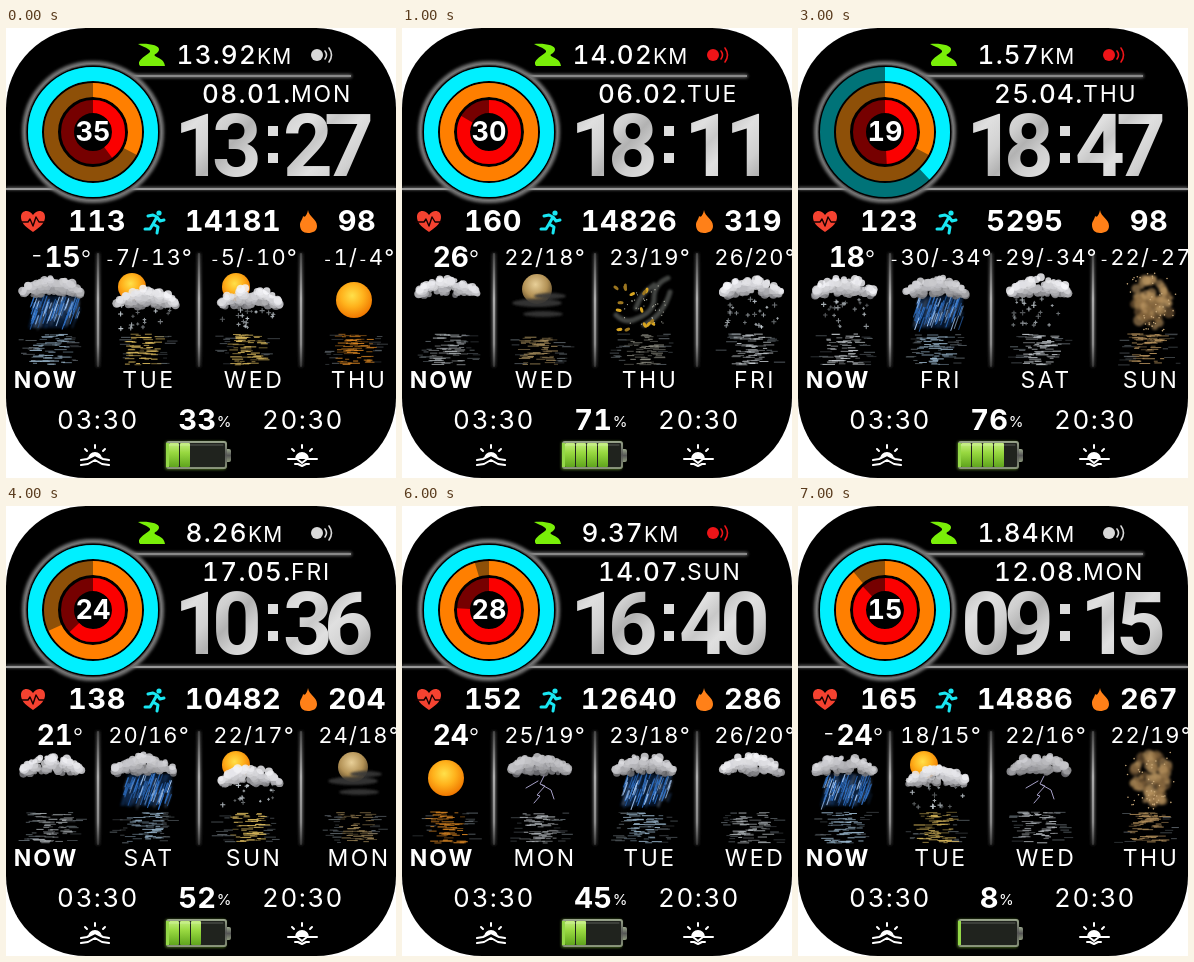
These frames come from a looping animation (390x450 px, 8 s). An HTML page:

```html
<!DOCTYPE html>
<html lang="en">
<head>
<meta charset="utf-8">
<title>Watch face</title>
<style>
html, body { margin: 0; width: 100%; height: 100%; overflow: hidden; background: #fff; }
svg { display: block; width: 390px; height: 450px; }
text { font-family: Inter, sans-serif; font-variant-numeric: tabular-nums; fill: #fff; white-space: pre; }
.clock { font-family: Roboto, sans-serif; font-weight: 700; font-size: 87px; fill: url(#metal); }
.line { fill: none; stroke-linecap: round; stroke-linejoin: round; }
</style>
</head>
<body>
<svg id="face" viewBox="0 0 390 450" xmlns="http://www.w3.org/2000/svg">
<defs>
  <clipPath id="body"><rect width="390" height="450" rx="80"/></clipPath>
  <filter id="glow" x="-30" y="-30" width="450" height="510" filterUnits="userSpaceOnUse"><feGaussianBlur stdDeviation="1.6"/></filter>
  <filter id="soft" x="-30%" y="-30%" width="160%" height="160%"><feGaussianBlur stdDeviation="1"/></filter>
  <linearGradient id="metal" gradientUnits="userSpaceOnUse" x1="170" y1="90" x2="212" y2="130" spreadMethod="reflect">
    <stop offset="0" stop-color="#c8c8c8"/><stop offset=".3" stop-color="#e0e0e0"/>
    <stop offset=".7" stop-color="#d0d0d0"/><stop offset="1" stop-color="#b2b2b2"/>
  </linearGradient>
  <linearGradient id="post" x1="0" y1="0" x2="0" y2="1">
    <stop offset="0" stop-color="#444"/><stop offset=".4" stop-color="#aaa"/>
    <stop offset=".8" stop-color="#888"/><stop offset="1" stop-color="#333"/>
  </linearGradient>
  <radialGradient id="sun" cx=".45" cy=".38" r=".62">
    <stop offset="0" stop-color="#ffe04a"/><stop offset=".5" stop-color="#ffb21c"/><stop offset="1" stop-color="#f07800"/>
  </radialGradient>
  <radialGradient id="moon" cx=".45" cy=".35" r=".65">
    <stop offset="0" stop-color="#e8cf98"/><stop offset=".6" stop-color="#b39256"/><stop offset="1" stop-color="#5e4a2a"/>
  </radialGradient>
  <linearGradient id="cell" x1="0" y1="0" x2="0" y2="1">
    <stop offset="0" stop-color="#c4ee80"/><stop offset=".4" stop-color="#98d840"/><stop offset="1" stop-color="#5fa51c"/>
  </linearGradient>
  <linearGradient id="shell" x1="0" y1="0" x2="0" y2="1">
    <stop offset="0" stop-color="#9aa68c"/><stop offset=".5" stop-color="#555"/><stop offset="1" stop-color="#8c987c"/>
  </linearGradient>
</defs>
</svg>
<script>
const STEP = 1000;
const DAYS = ['SUN', 'MON', 'TUE', 'WED', 'THU', 'FRI', 'SAT'];

// weekday, date, time, km, linked, dial, steps share, pulse, steps, kcal, battery, now, forecast, sky
const STATES = [
  [1, '08.01.', '13:27', '13.92', 1, '35', 1, 113, 14181, 98, 33, -15, ['-7/-13°', '-5/-10°', '-1/-4°'], 'rain sunsnow sunsnow sun'],
  [2, '06.02.', '18:11', '14.02', 0, '30', 1, 160, 14826, 319, 71, 26, ['22/18°', '23/19°', '26/20°'], 'cloud moon leaves snow'],
  [3, '13.03.', '00:09', '8.53', 1, '26', .42, 146, 5328, 188, 4, null, null, 'leaves snow rain rain'],
  [4, '25.04.', '18:47', '1.57', 0, '19', .38, 123, 5295, 98, 76, 18, ['-30/-34°', '-29/-34°', '-22/-27°'], 'snow rain snow dust'],
  [5, '17.05.', '10:36', '8.26', 1, '24', 1, 138, 10482, 204, 52, 21, ['20/16°', '22/17°', '24/18°'], 'cloud rain sunsnow moon'],
  [6, '08.06.', '19:02', '14.05', 0, '06', 1, 131, 5506, 251, 71, null, null, 'rain moon sunsnow rain'],
  [0, '14.07.', '16:40', '9.37', 0, '28', 1, 152, 12640, 286, 45, 24, ['25/19°', '23/18°', '26/20°'], 'sun storm rain cloud'],
  [1, '12.08.', '09:15', '1.84', 1, '15', 1, 165, 14886, 267, 8, -24, ['18/15°', '22/16°', '22/19°'], 'rain sunsnow storm dust'],
];

const text = (x, y, s, size, weight, gap = 0, anchor = 'middle') =>
  `<text x="${x}" y="${y}" font-size="${size}" font-weight="${weight}" letter-spacing="${gap}" text-anchor="${anchor}">${s}</text>`;
const span = (s, size, weight, extra = '') =>
  `<tspan font-size="${size}" font-weight="${weight}" ${extra}>${s}</tspan>`;
const line = (d, color, width = 1, extra = '') =>
  `<path class="line" d="${d}" stroke="${color}" stroke-width="${width}" ${extra}/>`;
const shape = (d, fill) => `<path d="${d}" fill="${fill}"/>`;
const dot = (x, y, r, fill, extra = '') =>
  `<circle cx="${x}" cy="${y}" r="${r}" fill="${fill}" ${extra}/>`;
const repeat = (n, fn) => Array.from({ length: n }, (_, i) => fn(i)).join('');

function random(seed) {
  return () => {
    seed = (seed * 1664525 + 1013904223) >>> 0;
    return seed / 4294967296;
  };
}

function ring(r, width, color, track, share) {
  const base = `cx="87" cy="104" r="${r}" fill="none" stroke-width="${width}"`;
  return `<circle ${base} stroke="${track}"/>` + (share >= 1
    ? `<circle ${base} stroke="${color}"/>`
    : `<circle ${base} stroke="${color}" pathLength="1" stroke-dasharray="${share} 2" transform="rotate(-90 87 104)"/>`);
}

// Weather pictures are drawn around x = 0.
function water(rnd, color) {
  return repeat(75, () => {
    const v = rnd(), y = 306 + v * 31;
    const x = (rnd() + rnd() - 1) * 32, w = 3 + rnd() * 9;
    const tint = Math.abs(x) < 17 ? color : '#5c646a';
    return line(`M${x - w / 2} ${y}h${w}`, tint, 1, `opacity="${.4 + rnd() * .55}"`);
  });
}

// A mound of small puffs, bright on top and dark along its flat base.
function cloud(rnd, light = 1) {
  const puff = i => {
    const x = (rnd() * 2 - 1) * 30, v = (i / 110 + rnd() * .3) / 1.3;
    const y = 268 - v * 20 * (1 - (x / 33) ** 2) ** .7;
    const c = Math.round((85 + 165 * Math.sqrt(v)) * light);
    return dot(x, y, 2 + rnd() * 2.5, `rgb(${c},${c},${c + 4})`, 'opacity=".85"');
  };
  return `<g>${repeat(110, puff)}</g>`;
}

const drops = rnd => shape('M-16 268H28L14 300H-24Z', '#0a2a55') + repeat(75, () => {
  const x = -18 + rnd() * 46, y = 267 + rnd() * 23, h = 5 + rnd() * 9;
  return line(`M${x} ${y}l${-h * .35} ${h}`, rnd() < .25 ? '#a3c6f2' : '#2f70c4', 1.1, `opacity="${.5 + rnd() * .5}"`);
});

const flakes = rnd => repeat(22, () => {
  const x = -27 + rnd() * 54, y = 271 + rnd() * 30, r = .8 + rnd() * 1.5;
  return line(`M${x - r} ${y}h${2 * r}M${x} ${y - r}v${2 * r}`, '#c4ccd2', 1.1, `opacity="${.4 + rnd() * .6}"`);
});

const SKY = {
  rain: rnd => water(rnd, '#9dbbd2') + `<g filter="url(#soft)" opacity=".5">${drops(rnd)}</g>` +
    drops(rnd).replace(/^.*?\/>/, '') + cloud(rnd, .9),
  snow: rnd => water(rnd, '#c8ced3') + flakes(rnd) + cloud(rnd),
  cloud: rnd => water(rnd, '#aeb4b8') + cloud(rnd),
  sunsnow: rnd => water(rnd, '#e2c060') + dot(-12, 259, 14, 'url(#sun)') + flakes(rnd) +
    `<g transform="translate(2 11)">${cloud(rnd)}</g>`,
  sun: rnd => water(rnd, '#e08a24') + dot(-2, 272, 18, 'url(#sun)'),
  moon: rnd => water(rnd, '#a38a5a') + dot(-3, 261, 15, 'url(#moon)') +
    '<g fill="#383838" opacity=".9" filter="url(#soft)"><ellipse cx="-3" cy="275" rx="25" ry="4"/>' +
    '<ellipse cx="10" cy="268" rx="16" ry="3"/><ellipse cx="3" cy="286" rx="20" ry="3"/></g>',
  storm: rnd => water(rnd, '#b3b8bd') + cloud(rnd, .85) +
    line('M4 270l-4 8 5 2-8 9 3 1-6 7M2 279l9 5 3 9M-2 275l-12 7', '#a59fc6', 1),
  leaves: rnd => water(rnd, '#8d8d83') +
    '<g filter="url(#soft)">' +
    line('M24 250Q10 256 10 270T-6 290Q-18 297-28 287M10 257Q-4 266-8 280M26 264Q20 286 0 297', '#777c78', 5, 'opacity=".55"') + '</g>' +
    repeat(34, () => dot((rnd() - .5) * 44, 256 + rnd() * 44, .6, '#b9b9ac')) +
    repeat(15, () => {
      const x = -31 + rnd() * 52, y = 257 + rnd() * 45;
      return `<ellipse cx="${x}" cy="${y}" rx="3" ry="1.6" fill="${rnd() < .5 ? '#d8a521' : '#9c7620'}" transform="rotate(${rnd() * 180} ${x} ${y})"/>`;
    }),
  dust: rnd => water(rnd, '#b9945e') + '<g filter="url(#soft)">' +
    repeat(75, () => {
      const a = rnd() * 6.283, d = Math.sqrt(rnd());
      return dot(4 + Math.cos(a) * d * 20, 274 + Math.sin(a) * d * 26, 2 + rnd() * 4, rnd() < .4 ? '#84643c' : '#b8935f', 'opacity=".6"');
    }) + '</g>' +
    repeat(45, () => dot(4 + (rnd() + rnd() - 1) * 30, 245 + rnd() * 58, .8, '#c6a677')),
};

function battery(level) {
  const cells = Math.round(level / 20);
  return '<rect x="159" y="413" width="61" height="29" rx="3" fill="#80bd3a" opacity=".5" filter="url(#soft)"/>' +
    '<rect x="219" y="421" width="6" height="13" rx="2" fill="url(#shell)"/>' +
    '<rect x="160" y="413" width="61" height="28" rx="3" fill="url(#shell)"/>' +
    '<rect x="162" y="415" width="57" height="24" rx="1" fill="#20231e"/>' +
    '<rect x="160" y="415" width="3" height="24" fill="#94d848"/>' +
    repeat(cells, i => `<rect x="${163 + i * 11}" y="415" width="10" height="24" rx="1" fill="url(#cell)"/>`) +
    line('M163 417H217', '#fff', 1, 'opacity=".25"');
}

function link(on) {
  const c = on ? '#d8d8d8' : '#ee1418';
  return dot(311, 27, 6, c) + line('M319 23q3 4 0 8M323 20q5 7 0 14', c, 1.6);
}

function backdrop() {
  const bars = '<rect x="120" y="46" width="226" height="4" rx="2"/><rect y="159" width="390" height="3"/>';
  const posts = [92, 193, 295];
  const post = (x, w) => `<rect x="${x - w / 2}" y="225" width="${w}" height="114" rx="1" fill="url(#post)"/>`;
  return '<rect width="390" height="450" fill="#000"/>' +
    `<g fill="#666" filter="url(#glow)">${bars}${posts.map(x => post(x, 3)).join('')}</g>` +
    '<rect x="122" y="47" width="223" height="2" fill="#888"/><rect y="160" width="390" height="2" fill="#999"/>' +
    posts.map(x => post(x, 2)).join('') +
    '<circle cx="87" cy="104" r="69" fill="#000" stroke="#777" stroke-width="4" filter="url(#glow)"/>' +
    '<circle cx="87" cy="104" r="68.5" fill="none" stroke="#777"/>' + dot(87, 104, 66.5, '#000');
}

function icons() {
  return shape('M132 16C142 15 154 17 153 22C152 26 147 26 149 28C152 30 158 31 159 38H134C130 33 138 29 143 25C147 22 140 20 132 16Z', '#79ef08') +
    shape('M27 204C18 198 15 194 15 189C15 182 23 181 27 187C31 181 39 182 39 189C39 194 36 198 27 204Z', '#f54230') +
    line('M14 194h8l2 -3 3 7 3 -9 3 5h6', '#160000', 1.4) +
    dot(153, 185, 2.6, '#19e6f2') +
    line('M142 188l5 -1 4 2 -4 7 5 3 -1 6M147 196l-3 5 -5 0M151 189l3 4 4 -1', '#19e6f2', 3) +
    shape('M302 182C303 189 311 191 311 198C311 203 307 205 302 205C297 205 294 202 294 197C294 193 297 191 297 188C299 190 301 187 302 182Z', '#ff8018') +
    shape('M82 431a7 7 0 0 1 14 0l-7 -4ZM289 431a7 7 0 0 1 14 0Z', '#fff') +
    line('M89 417v3M79 421l2 2M99 421l-2 2M75 432l6 -1 8 -4 8 4 6 1M75 437l7 -1 7 -4 7 4 7 1', '#fff', 2) +
    line('M296 417v3M286 421l2 2M306 421l-2 2M282 431h9l5 4 5 -4h10M289 436h3l4 2 4 -2h3', '#fff', 2) +
    text(92, 401, '03:30', 26, 400, 1.5) + text(297, 401, '20:30', 26, 400, 1.5) +
    text(40, 360, 'NOW', 23, 650, 2);
}

function scene([day, date, time, km, linked, dial, walked, pulse, steps, kcal, level, now, forecast, sky], n) {
  const columns = [143, 248, 353];
  const minus = now < 0 ? span('-', 24, 300, 'dy="-4"') : '';
  const figures = time.replace(':', '');
  // A "1" sits left in its cell, so it is moved to the middle.
  const places = [188, 231, 302, 343].map((x, i) => figures[i] === '1' ? x + 5 : x);
  const range = s => s.replace(/-/g, span('-', 15, 400));
  return ring(58, 14, '#00f0ff', '#007378', walked) +
    ring(42, 14, '#ff7f00', '#8e5008', kcal / 300) +
    ring(25.5, 13, '#fb0000', '#760000', (pulse - 70) / 108) +
    text(87, 113, dial, 27, 650, 0) +
    text(228.5, 36, km + span('KM', 21, 400), 26, 500, 1.2) + link(linked) +
    text(196, 75, date, 26, 450, 1.4, 'start') +
    text(285, 74, DAYS[day], 23, 400, 1.8, 'start') +
    `<text class="clock" x="${places.join(' ')}" y="148" text-anchor="middle">${figures}</text>` +
    '<g fill="#ddd"><rect x="262" y="98" width="10" height="10"/><rect x="262" y="125" width="10" height="10"/></g>' +
    text(91, 203, pulse, 29, 650, .6) + text(227, 203, steps, 29, 650, .6) + text(351, 203, kcal, 29, 650, .6) +
    (now === null ? '' : text(54, 239, minus + span(Math.abs(now), 28, 650, minus && 'dy="4"') + span('°', 23, 300), 28, 650)) +
    columns.map((x, i) =>
      (forecast ? text(x, 237, range(forecast[i]), 22, 400, 1.1) : text(x - 6, 236, '--', 22, 500, 1)) +
      text(x, 360, DAYS[(day + i + 1) % 7], 23, 400, 2.5)).join('') +
    sky.split(' ').map((kind, i) =>
      `<g transform="translate(${[46, 138, 242, 350][i]} 0)">${SKY[kind](random(n * 31 + i * 977 + 7))}</g>`).join('') +
    text(199, 402, level + span('%', 15, 400, 'dy="-3"'), 29, 650, .5) + battery(level);
}

const face = document.getElementById('face');
face.insertAdjacentHTML('beforeend', `<g clip-path="url(#body)">${backdrop()}${icons()}` +
  STATES.map((s, i) => `<g class="scene" display="none">${scene(s, i)}</g>`).join('') + '</g>');
const scenes = [...face.querySelectorAll('.scene')];

const start = performance.now();
let shown = -1;
function tick() {
  const i = Math.floor((performance.now() - start) / STEP) % scenes.length;
  if (i !== shown) {
    scenes.forEach((g, k) => g.setAttribute('display', k === i ? 'inline' : 'none'));
    shown = i;
  }
  requestAnimationFrame(tick);
}
tick();
</script>
</body>
</html>
```
